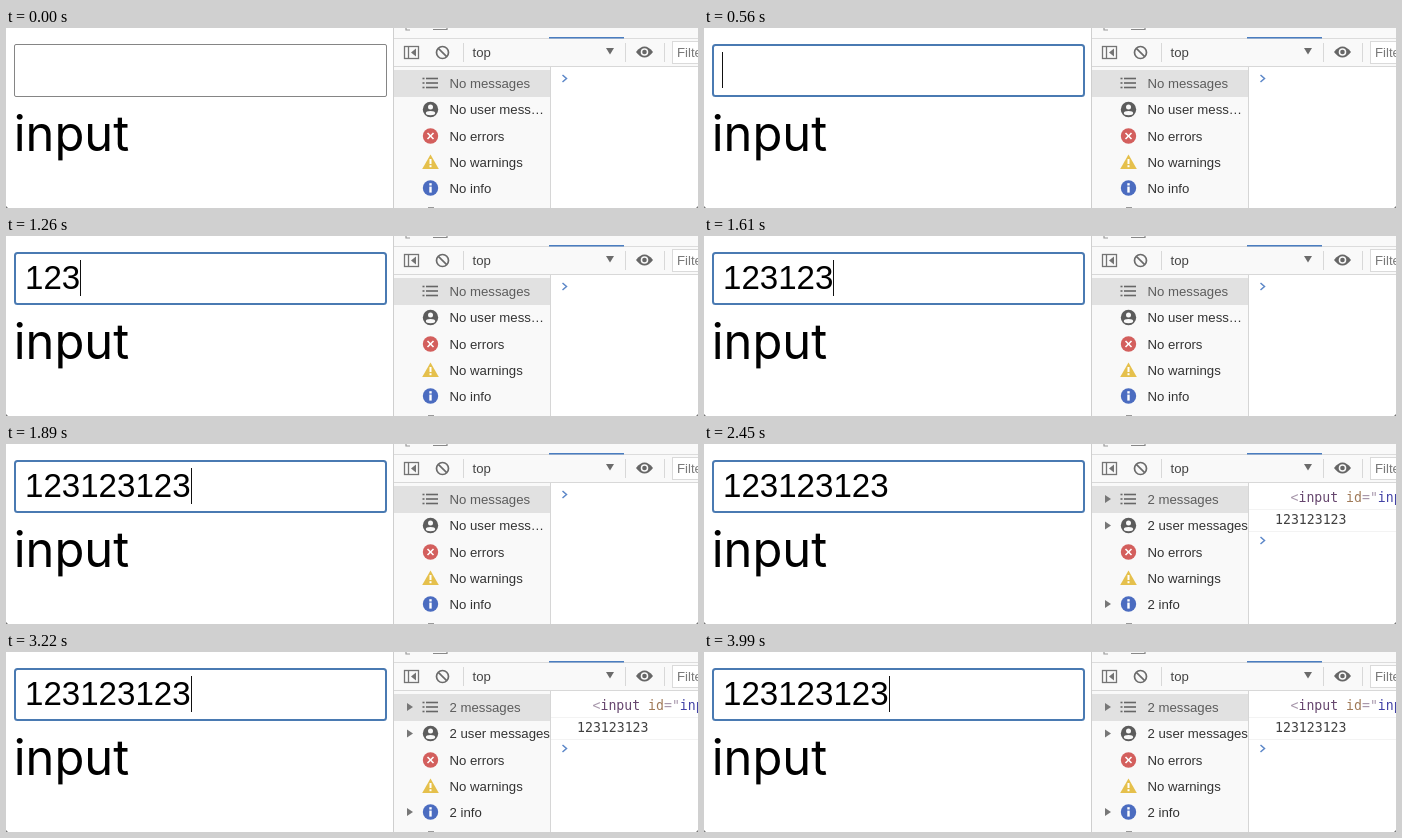
Recreate the animation shown at these times as an HTML page with a canvas. Size 692 by 180 pixels, loop 4130 ms.

```html
<!DOCTYPE html>
<html lang="en">
<head>
<meta charset="utf-8">
<title>Input event log</title>
<style>
html, body { margin: 0; width: 100%; height: 100%; overflow: hidden; background: #fff; }
canvas { display: block; }
</style>
</head>
<body>
<canvas id="stage" width="692" height="180"></canvas>
<script>
const ctx = document.getElementById('stage').getContext('2d');
const LOOP = 4130;
const SANS = '"Liberation Sans", Arial, sans-serif';
const LABEL = '13.2px ' + SANS;
const MONO = '13.2px "DejaVu Sans Mono", monospace';
const PANEL = '#f9f9f9';
const KEY_TIMES = [980, 1120, 1260, 1400, 1470, 1610, 1680, 1820, 1890];
const FOCUS = 560, SUGGEST = 770, SUGGEST_END = 1050, LOGGED = 2450;
const ROW_Y = [55, 81.5, 108, 134, 160];
const between = (t, a, b) => t >= a && t < b;

ctx.fontKerning = 'none';

function rect(x, y, w, h, color) {
  ctx.fillStyle = color;
  ctx.fillRect(x, y, w, h);
}

function text(str, x, y, font, color) {
  ctx.font = font;
  ctx.fillStyle = color;
  ctx.fillText(str, x, y);
  return x + ctx.measureText(str).width;
}

function poly(color, ...points) {
  ctx.fillStyle = color;
  ctx.beginPath();
  points.forEach(([x, y]) => ctx.lineTo(x, y));
  ctx.closePath();
  ctx.fill();
}

function stroke(color, width, ...points) {
  ctx.strokeStyle = color;
  ctx.lineWidth = width;
  ctx.beginPath();
  points.forEach(([x, y]) => ctx.lineTo(x, y));
  ctx.stroke();
}

function disc(x, y, r, color) {
  ctx.fillStyle = color;
  ctx.beginPath();
  ctx.arc(x, y, r, 0, Math.PI * 2);
  ctx.fill();
}

function ring(x, y, r, color, width) {
  ctx.strokeStyle = color;
  ctx.lineWidth = width;
  ctx.beginPath();
  ctx.arc(x, y, r, 0, Math.PI * 2);
  ctx.stroke();
}

function roundBox(x, y, w, h, r) {
  ctx.beginPath();
  ctx.roundRect(x, y, w, h, r);
}

function drawField(t) {
  const focused = t >= FOCUS;
  const inset = focused ? 1 : 0.5;
  roundBox(8 + inset, 16 + inset, 373 - 2 * inset, 53 - 2 * inset, focused ? 2.5 : 1.5);
  ctx.strokeStyle = focused ? '#4a7ab2' : '#858585';
  ctx.lineWidth = 2 * inset;
  ctx.stroke();

  const count = KEY_TIMES.filter(k => t >= k).length;
  const end = text('123123123'.slice(0, count), 19, 53, '33.1px ' + SANS, '#000');
  const caretOn = focused && !between(t, LOGGED, 2940) && !between(t, 3430, 3990);
  if (caretOn) rect(count ? Math.round(end) : 18, 24, 1, 36, '#111');
}

function drawSuggestion(t) {
  if (!between(t, SUGGEST, SUGGEST_END)) return;
  ctx.save();
  ctx.globalAlpha = t < SUGGEST + 70 ? 0.6 : 1;
  ctx.shadowColor = 'rgba(0,0,0,.4)';
  ctx.shadowBlur = 3;
  ctx.shadowOffsetY = 1;
  ctx.fillStyle = '#fff';
  roundBox(8, 70, 373, 52, [0, 0, 4, 4]);
  ctx.fill();
  ctx.restore();
  text('5 0 * 8 *', 20.5, 101, '500 13px Inter, sans-serif', '#111');
}

function drawToolbar() {
  rect(387, 0, 305, 180, PANEL);
  rect(387, 10, 305, 1, '#dcdcdc');
  rect(543, 9, 75, 1.5, '#4a7dc0');
  rect(387, 38, 305, 1, '#d8d8d8');
  stroke('#999', 1.2, [400, 0], [400, 2], [404, 2]);
  stroke('#888', 1.2, [427, 1.5], [441, 1.5], [441, 0]);

  ctx.strokeStyle = '#747474';
  ctx.lineWidth = 1.3;
  ctx.strokeRect(398.5, 18.5, 14, 12);
  stroke('#747474', 1.3, [402.5, 18], [402.5, 31]);
  poly('#747474', [410, 20.5], [410, 28.5], [405, 24.5]);
  ring(436.5, 24.5, 6, '#6b6b6b', 1.7);
  stroke('#6b6b6b', 1.7, [432.3, 20.3], [440.7, 28.7]);
  for (const x of [457, 619, 658]) rect(x, 15, 1, 19, '#d8d8d8');

  text('top', 466.5, 28.5, LABEL, '#444');
  poly('#6b6b6b', [600, 20], [608, 20], [604, 26.5]);

  ctx.fillStyle = '#666';
  ctx.beginPath();
  ctx.moveTo(630, 24);
  ctx.quadraticCurveTo(638.5, 13, 647, 24);
  ctx.quadraticCurveTo(638.5, 35, 630, 24);
  ctx.fill();
  disc(638.5, 24, 3.8, PANEL);
  disc(638.5, 24, 2.3, '#666');

  rect(666, 13, 26, 23, '#dadada');
  rect(667, 14, 25, 21, '#fff');
  text('Filter', 671, 29, LABEL, '#7a7a7a');
}

// Icons are centred on the origin.
const icons = [
  () => [-4.5, 0, 4.5].forEach(d => {
    rect(-8, d - 0.8, 2, 1.6, '#666');
    rect(-4.5, d - 0.8, 12, 1.6, '#666');
  }),
  () => {
    disc(0, 0, 7.7, '#5c5c5c');
    disc(0, -2.6, 2.5, PANEL);
    ctx.fillStyle = PANEL;
    ctx.beginPath();
    ctx.ellipse(0, 3.6, 4.7, 2.2, 0, 0, Math.PI * 2);
    ctx.fill();
  },
  () => {
    disc(0, 0, 7.7, '#d35f5d');
    stroke('#fff', 1.6, [-3, -3], [3, 3]);
    stroke('#fff', 1.6, [3, -3], [-3, 3]);
  },
  () => {
    poly('#e5c04c', [0, -7.5], [8.3, 7], [-8.3, 7]);
    rect(-1, -3, 2, 5, '#fff');
    rect(-1, 3.2, 2, 2, '#fff');
  },
  () => {
    disc(0, 0, 7.7, '#4b6cc0');
    rect(-1.2, -4.8, 2.4, 2.3, '#fff');
    rect(-1.2, -1.4, 2.4, 6, '#fff');
  }
];

function drawIcon(i, x, y) {
  ctx.save();
  ctx.translate(x, y);
  icons[i]();
  ctx.restore();
}

function drawSidebar(t) {
  const logged = t >= LOGGED;
  const labels = logged
    ? ['2 messages', '2 user messages', 'No errors', 'No warnings', '2 info']
    : ['No messages', 'No user mess…', 'No errors', 'No warnings', 'No info'];
  rect(388, 42, 157, 27, '#e1e1e1');
  if (between(t, 2730, 2940)) rect(388, 95, 157, 26, '#e8ecf6');

  ROW_Y.forEach((y, i) => {
    drawIcon(i, 424.5, y);
    text(labels[i], 443.5, y + 4.8, LABEL, i ? '#333' : '#5c5c5c');
    if (logged && labels[i][0] === '2') {
      poly('#777', [401, y - 4], [407, y], [401, y + 4]);
    }
  });
  rect(422, 179, 6, 1, '#999');
  rect(387, 0, 1, 180, '#cfcfcf');
  rect(545, 39, 147, 141, '#fff');
  rect(544, 39, 1, 141, '#d6d6d6');
}

function drawConsole(t) {
  const logged = t >= LOGGED;
  if (logged) {
    const tokens = [['<', '#a898ac'], ['input ', '#66466e'], ['id', '#a07a58'], ['="', '#a898ac'], ['input', '#4343a6']];
    let x = 586.5;
    for (const [part, color] of tokens) x = text(part, x, 58, MONO, color);
    text('123123123', 571, 80, MONO, '#404040');
    rect(545, 65, 147, 1, '#f3f3f3');
    rect(545, 87, 147, 1, '#f3f3f3');
  }
  const y = logged ? 96.5 : 50.5;
  stroke('#5c87c8', 1.5, [556.5, y - 3.5], [560.5, y], [556.5, y + 3.5]);
}

function draw(t) {
  rect(0, 0, 692, 180, '#fff');
  text('input', 7.8, 123.3, '48.8px Inter, sans-serif', '#000');
  drawSuggestion(t);
  drawField(t);
  drawToolbar();
  drawSidebar(t);
  drawConsole(t);
  poly('#777', [0, 178], [2, 180], [0, 180]);
  poly('#777', [692, 178], [692, 180], [690, 180]);
}

function tick() {
  draw(performance.now() % LOOP);
  requestAnimationFrame(tick);
}
tick();
</script>
</body>
</html>
```
